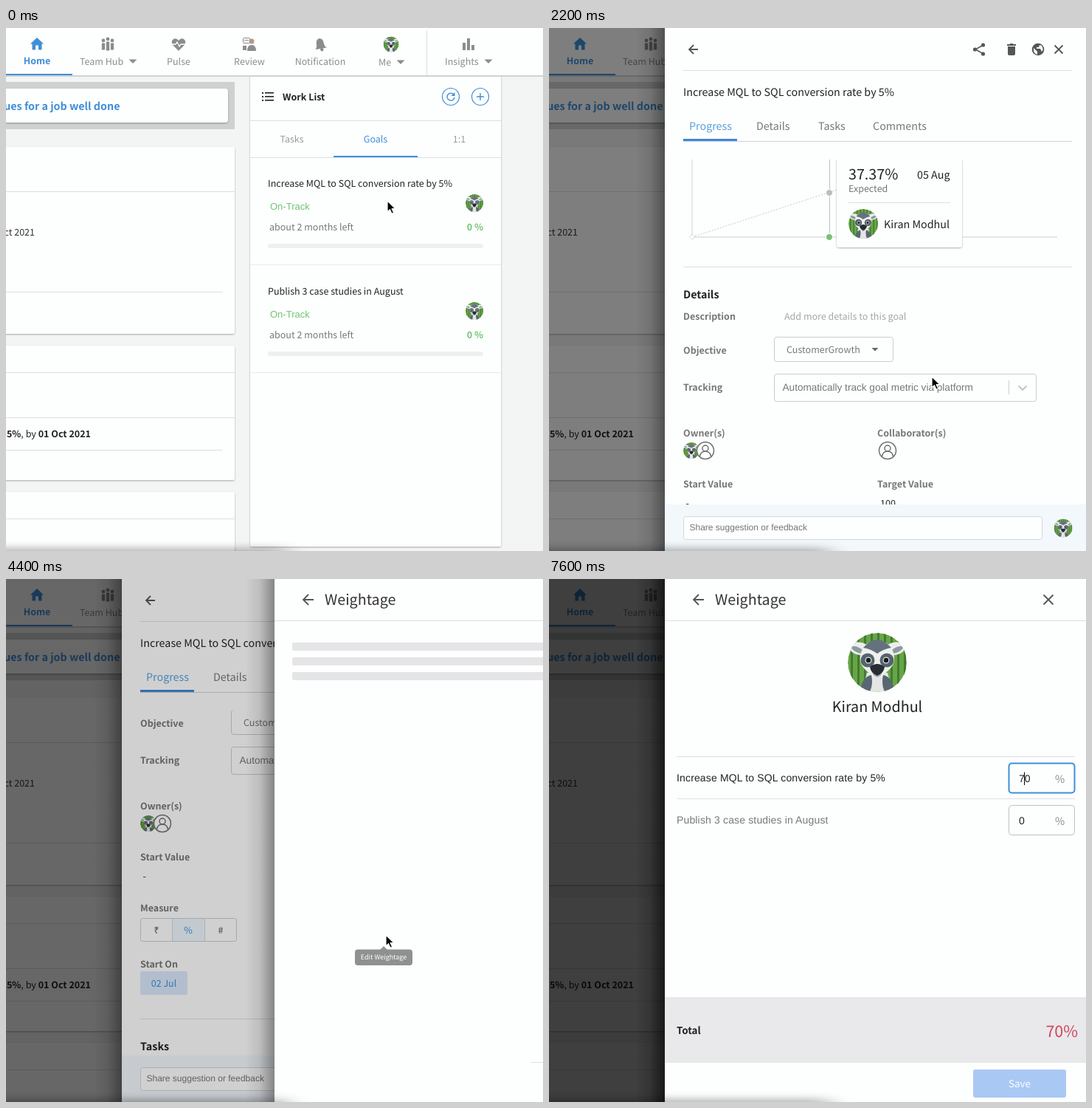
Write an HTML page that moves like this. It is 728x708 px and loops after 8 s.

```html
<!DOCTYPE html>
<html lang="en">
<head>
<meta charset="utf-8">
<title>Goal weightage walkthrough</title>
<style>
  html, body { margin: 0; width: 100%; height: 100%; overflow: hidden; background: #f3f4f4; }
  svg { display: block; width: 728px; height: 708px; }
  text { font-family: "Noto Sans CJK JP", "Noto Sans CJK SC", "Noto Sans CJK", "Noto Sans", sans-serif; text-rendering: geometricPrecision; white-space: pre; }
  .b { font-weight: 600; }
  .h { font-family: "Liberation Sans", Arial, sans-serif; }
  .m { text-anchor: middle; }
  .e { text-anchor: end; }
</style>
</head>
<body>
<svg id="stage" viewBox="0 0 728 708"></svg>
<script>
const BLUE = '#3f8fd8', GREEN = '#72c472', GREY = '#8c8c8c', LABEL = '#777', INK = '#222', PAPER = '#fdfefe', RULE = '#dcdfe1';
const PERSON = 'Kiran Modhul', GOAL = 'Increase MQL to SQL conversion rate by 5%', GOAL2 = 'Publish 3 case studies in August';

// The Latin letters of the CJK face are drawn larger than their nominal size.
const text = (x, y, s, fill = LABEL, size = 14, cls = '') =>
  `<text x="${x}" y="${y}" fill="${fill}" font-size="${size * .895}" class="${cls}">${s}</text>`;
const sans = (x, y, s, fill, size, more = '') =>
  `<text x="${x}" y="${y}" fill="${fill}" font-size="${size}" class="h" ${more}>${s}</text>`;
const rect = (x, y, x2, y2, fill, r = 0, more = '') =>
  `<rect x="${x}" y="${y}" width="${x2 - x}" height="${y2 - y}" rx="${r}" fill="${fill}" ${more}/>`;
const frame = (x, y, x2, y2, color = '#cbcdcf', r = 3, fill = PAPER, more = '') =>
  rect(x + .5, y + .5, x2 - .5, y2 - .5, fill, r, `stroke="${color}" ${more}`);
const line = (x, y, x2, y2 = y, color = RULE) => y === y2 ? rect(x, y, x2, y + 1, color) : rect(x, y, x + 1, y2, color);
const circle = (x, y, r, fill, more = '') => `<circle cx="${x}" cy="${y}" r="${r}" fill="${fill}" ${more}/>`;
const shape = (d, fill, more = '') => `<path d="${d}" fill="${fill}" ${more}/>`;
const stroke = (d, color, w = 1.5, more = '') => `<path d="${d}" fill="none" stroke="${color}" stroke-width="${w}" ${more}/>`;
const group = (id, inner, more = '') => `<g id="${id}" ${more}>${inner}</g>`;
const move = (x, y, inner) => `<g transform="translate(${x} ${y})">${inner}</g>`;
const avatar = (x, y, r) => `<use href="#lemur" transform="translate(${x} ${y}) scale(${r / 40})"/>`;
const caret = (x, y, w = 5.5, color = GREY) => shape(`M${x - w} ${y}h${2 * w}l${-w} ${w}z`, color);
const plus = (x, y) => circle(x, y, 11.5, 'none', `stroke="${BLUE}" stroke-width="1.2"`) + stroke(`M${x - 5} ${y}h10M${x} ${y - 5}v10`, BLUE, 1.4);
const cross = (x, y, s) => stroke(`M${x - s} ${y - s}l${2 * s} ${2 * s}m0 ${-2 * s}l${-2 * s} ${2 * s}`, '#555', 1.8);
const back = (x, y, s) => stroke(`M${x + s} ${y}H${x - s}m${s} ${-s}l${-s} ${s}l${s} ${s}`, '#555', 1.8);
const person = (x, y) => circle(x, y, 11.5, PAPER, 'stroke="#707070" stroke-width="1.5"') +
  circle(x, y - 3, 4, 'none', 'stroke="#707070" stroke-width="1.5"') + stroke(`M${x - 7.5} ${y + 8}q1 -7 7.5 -7t7.5 7`, '#707070');

function defs() {
  let stripes = '';
  for (let x = -36; x < 40; x += 9) stripes += rect(x, -40, x + 3, 40, '#437a32');
  const half = shape('M-12 -22C-20 -30 -36 -29 -39 -21C-36 -12 -26 -9 -17 -10z', '#eceeec') +
    shape('M-20 -17q-9 -7 -16 -4q5 8 15 9z', '#8d99a2') +
    shape('M-8 17q-14 3 -15 24h12q6 -10 3 -24z', '#596773');
  const eye = circle(-13, -3, 9.5, '#56636f') + circle(-12, -3, 4.5, '#d9dcd6') + circle(-12, -3, 3.2, '#15191d');
  const both = s => s + `<g transform="scale(-1 1)">${s}</g>`;
  return `<defs>
    <clipPath id="round"><circle r="40"/></clipPath>
    <clipPath id="view"><rect x="157" y="178" width="571" height="467"/></clipPath>
    <linearGradient id="edge"><stop offset="0" stop-opacity="0"/><stop offset=".5" stop-opacity=".09"/><stop offset="1" stop-opacity=".36"/></linearGradient>
    <filter id="blur" x="-20%" y="-200%" width="140%" height="500%"><feGaussianBlur stdDeviation="16 6"/></filter>
    <filter id="soft" x="-10%" y="-10%" width="120%" height="125%"><feDropShadow dx="0" dy="1" stdDeviation="1.2" flood-opacity=".32"/></filter>
    <g id="lemur" clip-path="url(#round)">${circle(0, 0, 40, '#67a645')}${stripes}
      ${shape('M-14 14h28l8 28h-44z', '#e3e6e5')}${both(half)}
      ${shape('M0 -30C16 -30 24 -16 23 -3C22 8 10 14 5 20H-5C-10 14 -22 8 -23 -3C-24 -16 -16 -30 0 -30z', '#eff0ee')}
      ${shape('M-19 -20Q0 -42 19 -20Q8 -18 0 -12Q-8 -18 -19 -20z', '#65727e')}${both(eye)}
      ${shape('M-8 8q8 -11 16 0q-1 11 -8 12q-7 -1 -8 -12z', '#a9b1b5')}
      ${shape('M-10 6q10 -8 20 0q-1 8 -10 12q-9 -4 -10 -12z', '#272d33')}</g>
  </defs>`;
}

function navigation() {
  const people = [-6, 6, 0].map((x, i) => circle(x, i < 2 ? -5 : -7, 2.4, GREY) +
    rect(x - 2.5, i < 2 ? -2 : -4, x + 2.5, i < 2 ? 8 : 9, GREY, 1.5, `stroke="${PAPER}" stroke-width=".7"`)).join('');
  return rect(0, 0, 728, 64, PAPER) + rect(0, 64, 728, 66, '#cfd2d4') + rect(0, 62, 90, 64, BLUE) +
    shape('M42 13l9 8.5h-2.5v8h-4.5v-6h-4v6h-4.500v-8H33z', BLUE) + text(42, 49, 'Home', BLUE, 14, 'b m') +
    move(138, 22, people) + text(100, 50, 'Team Hub', GREY) + caret(172, 42.500) +
    shape('M234 31l-8 -8q-3 -5 1 -8q4 -2 7 2q3 -4 7 -2q4 3 1 8z', GREY) + stroke('M224 22h6l2 -3l3 6l2 -3h7', PAPER, 1.3) +
    text(234, 50, 'Pulse', GREY, 14, 'm') +
    frame(321, 13, 331, 21, GREY, 1) + rect(323, 16, 329, 17, GREY) + circle(333, 18, 3.5, '#b39b82') +
    shape('M327 31q0 -8 6 -8t6 8z', GREY) + shape('M321 24h5v6h-5z', GREY) + text(330, 50, 'Review', GREY, 14, 'm') +
    move(426, 22, `<g transform="rotate(-10)">${shape('M-8 6q3 -2 3 -7q0 -6 5 -7q5 1 5 7q0 5 3 7z', GREY)}${circle(1, 7.500, 2.2, GREY)}</g>`) +
    text(426, 50, 'Notification', GREY, 14, 'm') +
    avatar(522, 22, 10.5) + text(505, 51, 'Me', GREY) + caret(535, 43.500) + line(570, 4, 570, 64) +
    rect(619, 20, 623, 30, GREY) + rect(625, 14, 629, 30, GREY) + rect(631, 23, 635, 30, GREY) +
    text(595, 50, 'Insights', GREY) + caret(654, 42.500);
}

function goalItem(y, title) {
  return text(355, y + 215, title, INK) + sans(358, y + 246, 'On-Track', GREEN, 13) +
    text(357, y + 274, 'about 2 months left', LABEL) + text(647, y + 274, '0 %', GREEN, 14, 'b e') +
    avatar(635, y + 237, 12) + rect(355, y + 292, 647, y + 298, '#efeff2', 3) + line(331, y + 320, 671, y + 320, '#e8eaeb');
}

function home() {
  const card = (y, y2) => rect(-10, y, 310, y2, PAPER, 3, 'filter="url(#soft)"');
  return rect(0, 0, 728, 708, '#f3f4f4') +
    rect(0, 73, 310, 137, '#cfd1d1') + rect(-10, 82, 301, 128, PAPER, 4, 'filter="url(#soft)"') +
    text(154.500, 111, 'colleagues for a job well done', BLUE, 16, 'b e') +
    card(161, 414) + line(0, 221, 310) + line(0, 357, 294) + text(39, 281, '01 Oct 2021', '#333', 14, 'e') +
    card(430, 612) + line(0, 466, 310, 466, '#dcdfeb') + line(0, 527, 310) + line(0, 571, 294) +
    text(115, 554, '<tspan class="b">5%</tspan>, by <tspan class="b">01 Oct 2021</tspan>', INK, 14, 'e') +
    card(628, 730) + line(0, 664, 310) +
    rect(331, 60, 671, 702, PAPER, 2, 'filter="url(#soft)"') + navigation() +
    [88, 93, 98].map(y => rect(347, y - 1, 349, y + 1, INK) + rect(351, y - 1, 363, y + .6, INK)).join('') +
    text(375, 98, 'Work List', INK, 14, 'b') +
    circle(603, 93, 11.500, 'none', `stroke="${BLUE}" stroke-width="1.2"`) + stroke('M607 90a5 5 0 1 0 1 4', BLUE, 1.4) +
    shape('M608.500 87v5h-5z', BLUE) + plus(643, 93) + line(331, 125, 671) +
    text(387.500, 155, 'Tasks', '#9b9b9b', 14, 'm') + text(501, 155, 'Goals', BLUE, 14, 'm') + text(614.500, 155, '1:1', '#9b9b9b', 14, 'm') +
    line(331, 175, 671) + rect(444, 173, 558, 175, BLUE) + goalItem(0, GOAL) + goalItem(146, GOAL2);
}

const sheet = rect(117, 0, 157, 708, 'url(#edge)') + rect(157, 0, 1300, 708, PAPER);

function chart() {
  const end = (x, y) => circle(x, y, 3, PAPER, 'stroke="#c4c4c4" stroke-dasharray="1.5 1.5"');
  const card = rect(390, 440, 560, 561, PAPER, 4, 'filter="url(#soft)"') +
    text(406, 469, '37.37%', INK, 22) + text(543.500, 468, '05 Aug', INK, 16, 'e') + text(406, 486, 'Expected', '#757575') +
    line(406, 500, 544) + avatar(426, 529, 20) + text(543, 535, PERSON, INK, 16, 'e');
  return line(193.500, 386, 193.500, 547, '#cfd0d6') + line(194, 546.500, 689, 546.500, '#cfd0d6') +
    stroke('M194 547L688 386', '#c8c8c8', 1, 'stroke-dasharray="2 2"') + end(194, 547) + end(380, 486.500) + end(688, 386) +
    circle(380, 547, 3.2, '#8fcf8c', 'stroke="#6aa86a" stroke-width=".8"') +
    group('hover', line(380, 386, 380, 547, '#c2c2c2') + circle(380, 487, 4.500, '#bdbdbd', `stroke="${PAPER}"`) +
      circle(380, 547, 4.500, '#78c274', `stroke="${PAPER}"`) + card);
}

function goalBody() {
  const label = (x, y, s) => text(x, y, s, LABEL, 14, 'b');
  const heading = (y, s) => text(182, y, s, INK, 16, 'b');
  return heading(196, 'Progress') + label(182, 233, 'Achieved') + text(186, 259, '0', INK) +
    label(445, 233, 'Status') + sans(456, 260, 'On-Track', GREEN, 14) +
    rect(196, 309, 682, 319, '#f6f0ec', 5) + rect(197, 305, 225, 323, PAPER, 4, 'stroke="#7cc47c" stroke-width="2"') +
    text(198, 337, '0%', '#333') + text(698, 337, '100%', LABEL, 14, 'e') + chart() + line(182, 587, 709) +
    heading(630, 'Details') + label(182, 659, 'Description') + text(319, 659, 'Add more details to this goal', '#a6a6a6') +
    label(182, 705, 'Objective') + frame(305, 682, 467, 716) + text(322, 704, 'CustomerGrowth', LABEL) + caret(442, 697, 4.500, '#666') +
    label(182, 755, 'Tracking') + frame(305, 732, 661, 770) +
    sans(316.500, 755, 'Automatically track goal metric via platform', '#777', 13.6) + line(623, 741, 623, 760, '#ccc') +
    stroke('M636.500 748.500l5.500 5.500l5.500 -5.500', '#c0c0c0', 1.8) +
    label(182, 817, 'Owner(s)') + avatar(193, 836, 11) + person(212, 836) + label(445, 817, 'Collaborator(s)') + person(459, 836) +
    label(182, 886, 'Start Value') + text(185.500, 912, '-', INK) + label(445, 886, 'Target Value') + text(449, 912, '100', INK) +
    label(182, 955, 'Measure') + frame(182, 964, 313, 996) + rect(226, 965, 269, 995, '#edf6fd') +
    line(225, 964, 225, 996, '#d3d5d7') + line(269, 964, 269, 996, '#d3d5d7') +
    text(204, 985, '₹', '#555', 14, 'm') + text(247, 985, '%', BLUE, 14, 'm') + text(291, 985, '#', '#555', 14, 'm') +
    label(445, 955, 'My Weightage') + frame(445, 964, 537, 996, '#dfe1e3') + line(490, 964, 490, 996) + text(470, 986, '0%', '#555', 16, 'm') +
    stroke('M513 973h-9v16h15v-9', '#666', 1.8) + stroke('M510 983l9 -10', '#666', 3) + circle(520, 972, 1.6, '#666') +
    frame(545, 964, 585, 996, '#dfe1e3') + shape('M556 980q9 -12 18 0q-9 12 -18 0z', '#666') + circle(565, 980, 3.8, PAPER) + circle(565, 980, 2.2, '#666') +
    label(182, 1031, 'Start On') + rect(182, 1036, 246, 1068, '#d9e8fb', 3) + text(214, 1057, '02 Jul', BLUE, 14, 'm') +
    label(445, 1031, 'Due Date') + rect(445, 1036, 509, 1068, '#e4f5e4', 3) + text(477, 1057, '01 Oct', GREEN, 14, 'm') +
    line(182, 1100, 709) + heading(1143, 'Tasks') + plus(592, 1137) + text(708.500, 1142, 'Create new task', BLUE, 14, 'e');
}

function goalDrawer() {
  const tabs = [[190, 'Progress'], [281, 'Details'], [365, 'Tasks'], [439, 'Comments']];
  return sheet + back(196, 29, 6) +
    stroke('M589 23L578 29L589 35', '#555') + [[588.500, 23], [577.500, 29], [588.500, 35]].map(p => circle(...p, 2.6, '#555')).join('') +
    shape('M621 22h3.500l1 -1h3l1 1h3.500v2h-12zM622 25h10v10q0 2 -2 2h-6q-2 0 -2 -2z', '#555') +
    circle(663, 29, 8.300, '#555') + shape('M657 27l5 5v4q-6 -2 -5 -9zM661 28h5l2 4q3 -3 0 -8l-3 -1l-1 3h-3z', PAPER) + cross(691, 29, 5.500) +
    line(182, 57, 709) + text(182, 92, GOAL, INK, 16) +
    tabs.map(([x, s], i) => text(x, 138, s, i ? LABEL : '#58a0dc', 16)).join('') +
    line(182, 153, 709, 153, '#cfd2d4') + rect(182, 150, 255, 153, '#3f86dd') +
    `<g clip-path="url(#view)">${group('body', goalBody())}</g>` +
    rect(157, 645, 728, 708, '#f2f8fc') + frame(182, 661, 669, 693, '#d3d7da') +
    sans(190.500, 680, 'Share suggestion or feedback', '#757575', 12) + avatar(697, 677, 12.500);
}

function weightDrawer() {
  const row = (y, s, id) => sans(173, y + 274, s, '#777', 14, `id="${id}" letter-spacing=".15"`) +
    frame(623, y + 249, 713, y + 290, '#c0c0c0', 4, PAPER, `id="${id}Box"`) +
    sans(637, y + 275, '0', INK, 14, `id="${id}Value"`) + text(686, y + 276, '%', '#8a8a8a', 16);
  const skeleton = [86, 106, 126].map(y => rect(181, y, 709, y + 11, '#e5e5e7', 2)).join('') + line(504, 654, 728);
  const loaded = cross(677, 28, 6.500) + avatar(445, 113, 40) + text(445, 180, PERSON, INK, 22, 'm') +
    line(173, 240, 713) + row(0, GOAL, 'first') + line(173, 297, 713) + row(57, GOAL2, 'second') +
    group('bar', rect(0, 261.500, 1, 279, '#000')) +
    rect(157, 566, 728, 655, '#e9e9eb') + text(173, 616, 'Total', INK, 15, 'b') +
    `<text id="total" class="e" x="717" y="620" font-size="${24 * .895}" font-weight="500" fill="#d3455c"></text>` +
    rect(575, 664, 701, 702, '#a9c8f4', 3) + text(638, 688, 'Save', PAPER, 15, 'm');
  return sheet + back(203, 28, 7) + text(225, 35, 'Weightage', '#333', 22) + line(157, 56, 728) +
    group('skeleton', skeleton) + group('loaded', loaded);
}

const outline = 'stroke="#fff" stroke-width="1.2" stroke-linejoin="round"';
const pointers =
  group('arrow', shape('M0 0v15l3.500 -3.300l2.500 5.500l2.600 -1.200l-2.500 -5.300h5z', '#000', outline)) +
  group('hand', shape('M4 1q2 -2 3 0l1 6l5 1q2 0 2 3l-1 6h-8l-5 -6q-1 -3 2 -2l2 2z', '#fff', 'stroke="#000" stroke-width="1.2"') +
    stroke('M8 11v4M10.500 11v4', '#000', 1)) +
  group('beam', stroke('M-3 -8q3 0 3 2v12q0 2 -3 2M3 -8q-3 0 -3 2v12q0 2 3 2M-2 1h4', '#111', 1.3));

document.getElementById('stage').innerHTML = defs() + home() +
  rect(0, 0, 728, 708, '#000', 0, 'id="dim1"') + group('drawer1', goalDrawer()) +
  rect(0, 0, 728, 708, '#000', 0, 'id="dim2"') + group('drawer2', weightDrawer()) +
  group('tip', shape('M507 502l5 -5l5 5z', '#666') + rect(473, 501.500, 551, 523, '#666', 4) + text(512, 515, 'Edit Weightage', '#fff', 10, 'm')) +
  `<rect x="-60" y="705" width="440" height="30" opacity=".33" filter="url(#blur)"/>` + group('pointer', pointers);

const el = {};
document.querySelectorAll('[id]').forEach(node => el[node.id] = node);

// Each track lists [time, values...], joined by straight steps.
const tracks = {
  slide1: [[1000, 728], [1200, 330], [1400, 161], [1600, 157]],
  dim1: [[1000, 0], [1200, .33], [1400, .5]],
  scroll: [[1800, 0], [2200, 264], [2400, 264], [2800, 505]],
  slide2: [[4200, 728], [4400, 364], [4600, 176], [4800, 157]],
  dim2: [[4200, 0], [4400, .18], [4600, .43], [4800, .5]],
  tip: [[3000, 0], [3200, 1], [4200, 1], [4400, .72], [4600, 0]],
  pointer: [[0, 517, 234], [1000, 517, 232], [1400, 645, 210], [1800, 400, 470], [2200, 519, 472], [2800, 519, 474],
    [3200, 513, 483], [4200, 513, 483], [4400, 515, 482], [5200, 515, 482], [6000, 640, 267]]
};

function at(name, t) {
  const track = tracks[name], next = track.findIndex(k => k[0] > t);
  if (next < 0) return track[track.length - 1].slice(1);
  if (next === 0) return track[0].slice(1);
  const a = track[next - 1], b = track[next], p = (t - a[0]) / (b[0] - a[0]);
  return a.slice(1).map((v, i) => v + (b[i + 1] - v) * p);
}

const show = (node, on) => node.style.display = on ? '' : 'none';
const place = (node, x, y) => node.setAttribute('transform', `translate(${x} ${y})`);

function draw(t) {
  for (const n of [1, 2]) {
    const [x] = at('slide' + n, t);
    place(el['drawer' + n], x - 157, 0);
    show(el['drawer' + n], x < 728);
    el['dim' + n].style.opacity = at('dim' + n, t)[0];
  }
  place(el.body, 0, -at('scroll', t)[0]);
  show(el.hover, t >= 1800 && t < 3000);
  el.tip.style.opacity = at('tip', t)[0];

  show(el.skeleton, t < 5000);
  show(el.loaded, t >= 5000);
  const hovered = t >= 5800, focused = t >= 6200, typed = t >= 7000;
  el.firstBox.setAttribute('stroke', focused ? BLUE : hovered ? '#333' : '#c0c0c0');
  el.firstBox.setAttribute('stroke-width', focused ? 2 : 1);
  el.first.setAttribute('fill', focused ? INK : '#777');
  el.firstValue.textContent = typed ? '70' : '0';
  el.total.textContent = typed ? '70%' : '0%';
  show(el.bar, focused);
  place(el.bar, typed ? 644 : 636.500, 0);

  place(el.pointer, ...at('pointer', t));
  const hand = t >= 3200 && t < 4400;
  show(el.hand, hand);
  show(el.arrow, !hand && !hovered);
  show(el.beam, hovered && !typed);
}

const start = performance.now();
function tick() {
  draw(Math.floor((performance.now() - start) % 8000 / 200) * 200);
  requestAnimationFrame(tick);
}
tick();
</script>
</body>
</html>
```
